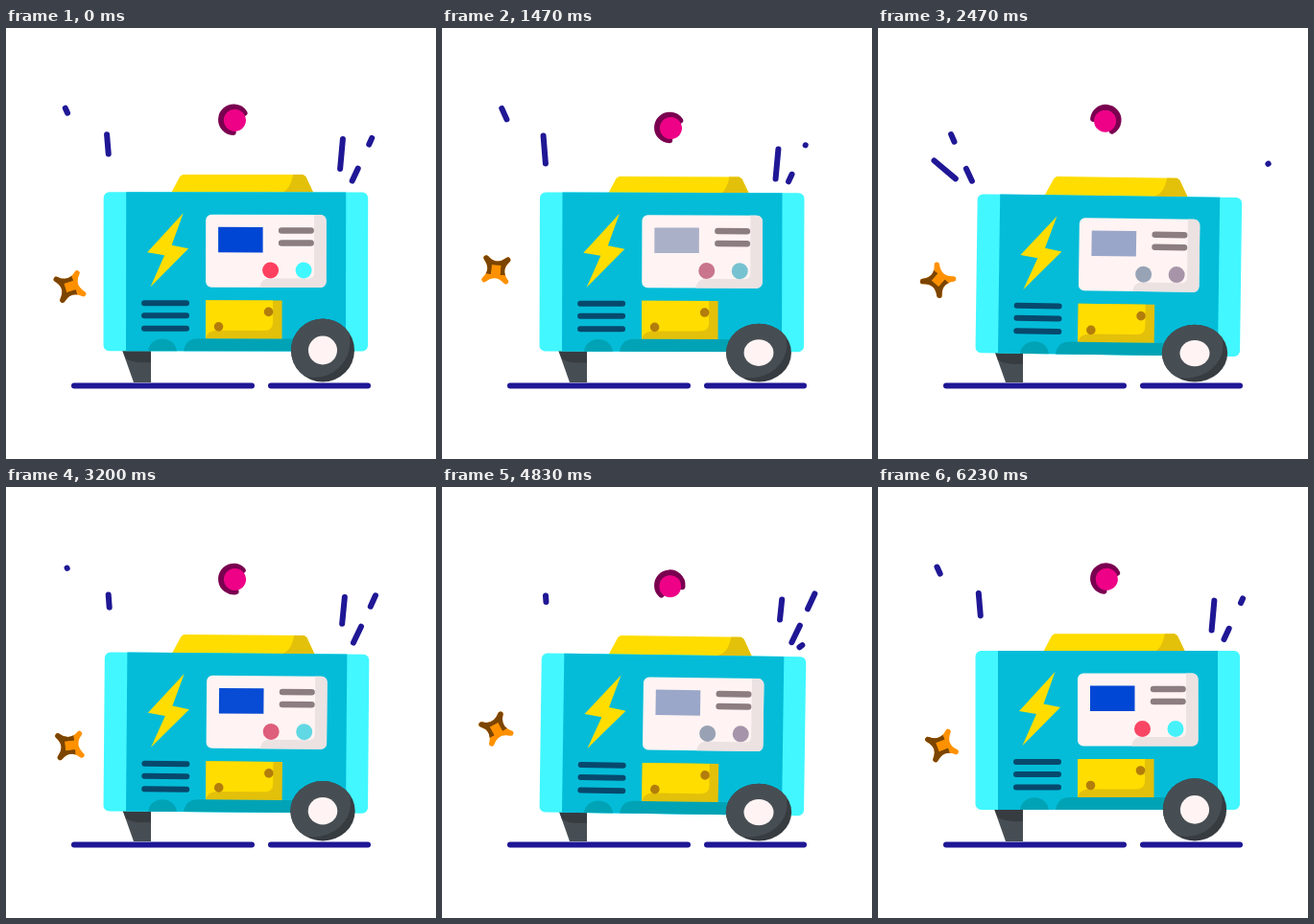
An HTML page with a canvas that plays this animation: 448 px wide and 450 px high, repeating every 6260 ms.

```html
<!DOCTYPE html>
<html lang="en">
<head>
<meta charset="utf-8">
<title>Running generator</title>
<style>
html, body { margin: 0; width: 100%; height: 100%; overflow: hidden; background: #fff; }
canvas { display: block; width: 448px; height: 450px; }
</style>
</head>
<body>
<canvas id="stage" width="448" height="450"></canvas>
<script>
const ctx = document.getElementById('stage').getContext('2d');
const CYCLE = 3130;
const TAU = Math.PI * 2;
const NAVY = '#1f1795', BODY = '#04bcd8', GLOW = '#42f7ff', SHADE = '#00a3b5';
const YELLOW = '#ffdd00', GOLD = '#e3c00a', BROWN = '#b37d0c';
const CREAM = '#fff4f3', CREAM_SHADE = '#ece2e2';
const STEEL = '#474e53', STEEL_SHADE = '#373c41';
const RED = [255, 64, 95], CYAN = [64, 247, 255];
const BLUE = [0, 70, 213], PALE = [184, 185, 199];

// Outward streaks: base, tip, start time, delay of the tail
const STREAKS = [
  [95.5, 157.5, 82.2, 130, 680, 300],
  [76.5, 116.7, 61.5, 83.5, 795, 355],
  [84, 160, 50, 132, 500, 325],
  [109, 161, 104.8, 111, 990, 285],
  [346.5, 162, 351, 111.5, 1115, 300],
  [360.5, 159, 373.5, 131, 1340, 310],
  [378, 121, 393, 87, 1470, 340],
  [370, 161, 404, 135.3, 95, 325]
];
const STREAK_TIME = 490;

const clamp = v => Math.max(0, Math.min(1, v));
const pulse = (p, beats, shift = 0) => Math.sin(Math.PI * (p * beats + shift)) ** 2;
const mix = (a, b, k) => `rgb(${a.map((v, i) => Math.round(v + (b[i] - v) * k))})`;

function group(draw) {
  ctx.save();
  draw();
  ctx.restore();
}

function box(x, y, x2, y2, color, r = 0) {
  ctx.fillStyle = color;
  ctx.beginPath();
  ctx.roundRect(x, y, x2 - x, y2 - y, r);
  ctx.fill();
}

function disc(x, y, r, color) {
  ctx.fillStyle = color;
  ctx.beginPath();
  ctx.arc(x, y, r, 0, TAU);
  ctx.fill();
}

function line(x, y, x2, y2, color, width = 6) {
  ctx.strokeStyle = color;
  ctx.lineWidth = width;
  ctx.lineCap = 'round';
  ctx.beginPath();
  ctx.moveTo(x, y);
  ctx.lineTo(x2, y2);
  ctx.stroke();
}

function trace(points) {
  ctx.beginPath();
  points.forEach(([x, y]) => ctx.lineTo(x, y));
  ctx.closePath();
}

function poly(points, color) {
  trace(points);
  ctx.fillStyle = color;
  ctx.fill();
}

function tilt(x, y, angle) {
  ctx.translate(x, y);
  ctx.rotate(angle);
  ctx.translate(-x, -y);
}

function shake(b) {
  ctx.translate(0, 2.5 * b);
  tilt(101, 337, 0.0147 * b);
}

function streaks(t) {
  const beat = CYCLE / 2;
  for (const [x, y, x2, y2, start, delay] of STREAKS) {
    const age = (t - start + 2 * beat) % beat;
    const head = clamp(age / STREAK_TIME);
    const tail = clamp((age - delay) / STREAK_TIME);
    if (head <= tail) continue;
    const at = k => [x + (x2 - x) * k, y + (y2 - y) * k];
    line(...at(tail), ...at(head), NAVY);
  }
}

function lid(b, w) {
  ctx.translate(2.3 * b, 2.8 * w);
  tilt(246, 172, 0.0147 * b);
  const edge = [[171, 174], [181, 155], [184, 153], [309, 153], [312, 155], [322, 176], [171, 176]];
  poly(edge, YELLOW);
  trace(edge);
  ctx.clip();
  ctx.fillStyle = GOLD;
  ctx.beginPath();
  ctx.moveTo(299, 152);
  ctx.bezierCurveTo(297, 164, 293, 171, 284, 173);
  ctx.lineTo(284, 180);
  ctx.lineTo(325, 180);
  ctx.lineTo(325, 152);
  ctx.fill();
}

function leg(b) {
  const edge = [[121, 336], [151, 336], [151, 370], [133, 370]];
  poly(edge, STEEL);
  trace(edge);
  ctx.clip();
  ctx.fillStyle = STEEL_SHADE;
  ctx.beginPath();
  ctx.moveTo(118, 330);
  ctx.lineTo(125, 345 + 2 * b);
  ctx.quadraticCurveTo(132, 350 + 2 * b, 151, 349 + 2 * b);
  ctx.lineTo(151, 330);
  ctx.fill();
}

function panel(p) {
  const swap = pulse(p, 6);
  box(208, 194.5, 333.5, 270.5, CREAM, 6);
  group(() => {
    ctx.beginPath();
    ctx.roundRect(208, 194.5, 125.5, 76, 6);
    ctx.clip();
    ctx.fillStyle = CREAM_SHADE;
    ctx.beginPath();
    ctx.moveTo(321, 190);
    ctx.lineTo(321, 255);
    ctx.quadraticCurveTo(321, 261, 315, 261);
    ctx.lineTo(274, 261);
    ctx.quadraticCurveTo(265, 261, 264, 272);
    ctx.lineTo(336, 272);
    ctx.lineTo(336, 190);
    ctx.fill();
  });
  box(221, 207.5, 267.5, 234, mix(BLUE, PALE, pulse(p, 3)));
  for (const y of [211, 224]) line(287, y, 317.5, y, '#8c7d80', 6.5);
  disc(275.5, 252.5, 8.5, mix(RED, CYAN, swap));
  disc(310, 252.5, 8.5, mix(CYAN, RED, swap));
}

function door() {
  box(208, 284, 287.5, 324, GOLD);
  ctx.fillStyle = YELLOW;
  ctx.beginPath();
  ctx.moveTo(208, 284);
  ctx.lineTo(278, 284);
  ctx.lineTo(278, 307);
  ctx.quadraticCurveTo(278, 315.5, 269, 315.5);
  ctx.lineTo(219, 315.5);
  ctx.quadraticCurveTo(210, 316, 208, 324);
  ctx.fill();
  disc(221.5, 311.5, 4.8, BROWN);
  disc(273.5, 296, 4.8, BROWN);
}

function body(p) {
  box(101.5, 171, 377, 337, GLOW, 6);
  box(125, 171, 354, 337, BODY);
  ctx.fillStyle = SHADE;
  ctx.beginPath();
  ctx.moveTo(148, 337);
  ctx.bezierCurveTo(150, 320, 176, 320, 178, 337);
  ctx.moveTo(185, 337);
  ctx.quadraticCurveTo(187, 324, 200, 324);
  ctx.lineTo(354, 324);
  ctx.lineTo(354, 337);
  ctx.fill();
  poly([[184.5, 193], [147, 234], [165, 237], [150.5, 270], [190, 230], [172.5, 226.5]], YELLOW);
  for (const y of [287, 300, 313.5]) line(144, y, 188, y, '#07496d');
  panel(p);
  door();
}

function wheel(w) {
  ctx.translate(330, 369.5);
  ctx.scale(1 + 0.035 * w, 1 - 0.095 * w);
  ctx.translate(0, -33);
  disc(0, 0, 33, STEEL_SHADE);
  group(() => {
    ctx.beginPath();
    ctx.arc(0, 0, 33, 0, TAU);
    ctx.clip();
    disc(-9, -9, 37.5, STEEL);
  });
  disc(0, 0, 15, CREAM);
}

function orb(p) {
  const y = 94.9 + 9.4 * pulse(p, 1, 0.096);
  const gap = (38 - 90 * Math.sin(TAU * (p + 0.013))) * Math.PI / 180;
  const half = 1.1;
  ctx.translate(237.3, y);
  ctx.rotate(gap);
  ctx.strokeStyle = '#7a0050';
  ctx.lineWidth = 6.5;
  ctx.lineCap = 'round';
  ctx.beginPath();
  ctx.arc(0, 0, 13, half, TAU - half);
  ctx.stroke();
  disc(1.3, 0, 11.5, '#ee0087');
}

function starShape(color) {
  const a = 11.3;
  ctx.fillStyle = ctx.strokeStyle = color;
  ctx.lineWidth = 5.5;
  ctx.lineJoin = 'round';
  ctx.beginPath();
  ctx.moveTo(-a, -a);
  ctx.quadraticCurveTo(0, -1, a, -a);
  ctx.quadraticCurveTo(1, 0, a, a);
  ctx.quadraticCurveTo(0, 1, -a, a);
  ctx.quadraticCurveTo(-1, 0, -a, -a);
  ctx.closePath();
  ctx.fill();
  ctx.stroke();
}

function star(p) {
  const k = pulse(p, 1);
  const angle = 213 + 88 * Math.sin(TAU * (p - 0.096));
  ctx.translate(66.5 - 10.3 * k, 270 - 17.8 * k);
  ctx.rotate((angle + 90) * Math.PI / 180);
  starShape('#ff9100');
  trace([[-22, -22], [22, -22], [22, 5], [5, 5], [5, -5], [-5, -5], [-5, 5], [-22, 5]]);
  ctx.clip();
  starShape('#7b4500');
}

function draw(t) {
  const p = t / CYCLE;
  const b = pulse(p, 8, 0.09);
  const w = pulse(p, 12);
  ctx.fillStyle = '#fff';
  ctx.fillRect(0, 0, 448, 450);
  line(71, 373.5, 256, 373.5, NAVY);
  line(276, 373.5, 377, 373.5, NAVY);
  group(() => leg(b));
  group(() => lid(b, w));
  group(() => {
    shake(b);
    streaks(t);
    body(p);
  });
  group(() => wheel(w));
  group(() => orb(p));
  group(() => star(p));
}

const begin = performance.now();
function tick() {
  draw((performance.now() - begin) % CYCLE);
  requestAnimationFrame(tick);
}
tick();
</script>
</body>
</html>
```
